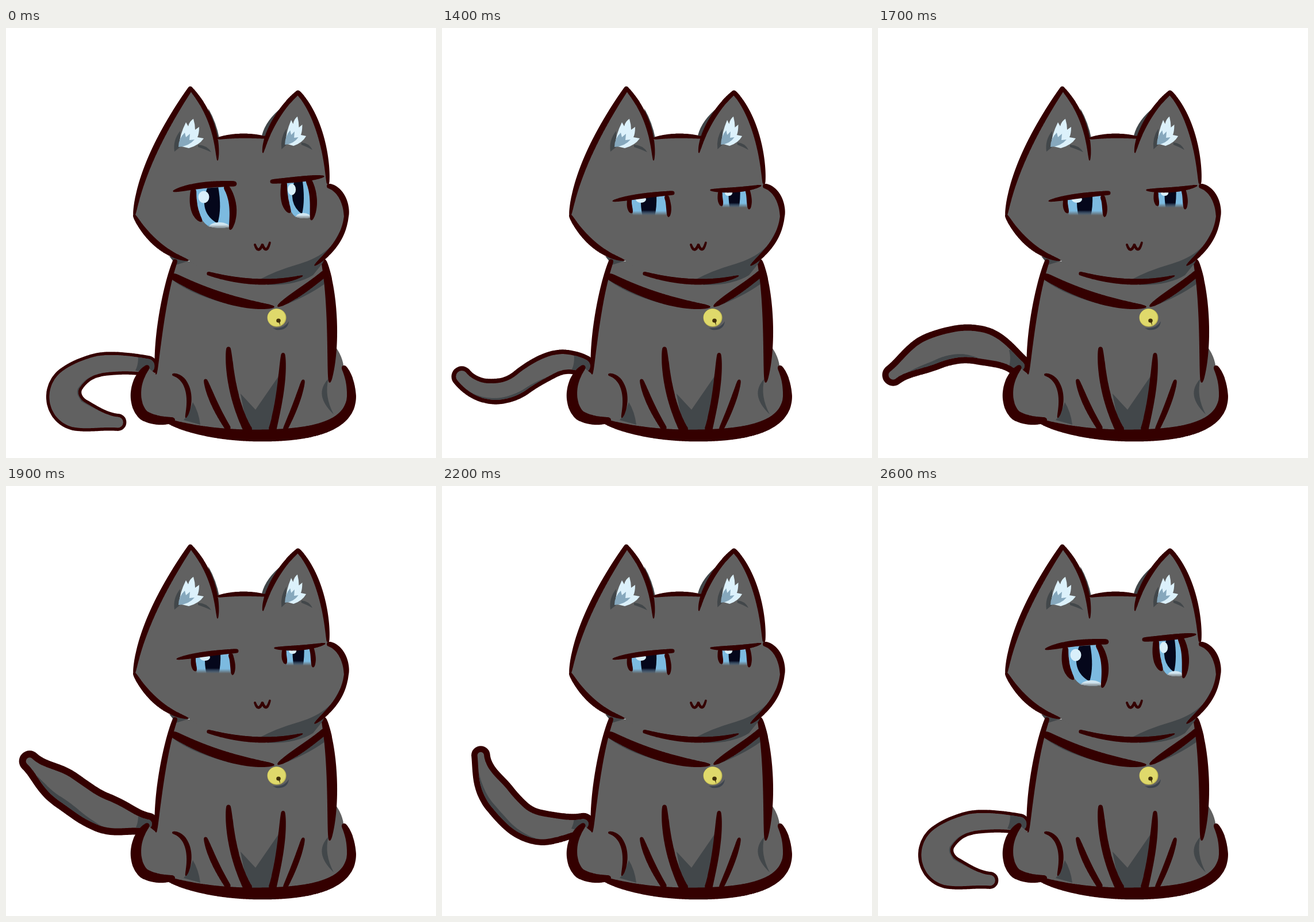
Recreate the animation shown at these times as an HTML page with a canvas. Size 748x748 px, loop 4 s.

```html
<!DOCTYPE html>
<html lang="en">
<head>
<meta charset="utf-8">
<title>Cat</title>
<style>
  html, body { margin: 0; width: 100%; height: 100%; overflow: hidden; background: #fff; }
  canvas { display: block; }
</style>
</head>
<body>
<canvas id="stage" width="748" height="748"></canvas>
<script>
const ctx = document.getElementById('stage').getContext('2d');
const FUR = '#616161', LINE = '#340000', SHADE = '#42474a';
const BLUE = '#7cbae0', PUPIL = '#05071b', SHINE = '#d9effa', TUFT = '#dcf1fb', TUFT_SHADE = '#86a8bd';
const { PI, sin, cos, min, max } = Math;
const lerp = (a, b, t) => a + (b - a) * t;

function fill(shape, color) {
  ctx.fillStyle = color;
  ctx.fill(typeof shape === 'string' ? new Path2D(shape) : shape);
}

function oval(x, y, rx, ry, color) {
  const path = new Path2D();
  path.ellipse(x, y, rx, ry, 0, 0, 7);
  fill(path, color);
}

function clipped(shape, draw) {
  ctx.save();
  ctx.clip(typeof shape === 'string' ? new Path2D(shape) : shape);
  draw();
  ctx.restore();
}

function fade(from, to, y0, y1) {
  const g = ctx.createLinearGradient(0, y0, 0, y1);
  g.addColorStop(0, from);
  g.addColorStop(1, to);
  return g;
}

// A round brush pressed at every point
function stamp(points, inset = 0) {
  const path = new Path2D();
  for (const { x, y, r } of points) {
    const size = max(r - inset, 0.3);
    path.moveTo(x + size, y);
    path.arc(x, y, size, 0, 7);
  }
  return path;
}

// Brush stroke along a curve: radius r0 and r1 at the ends, swelling to w between
const strokes = {};
function brush(d, w, r0, r1) {
  const curve = document.createElementNS('http://www.w3.org/2000/svg', 'path');
  curve.setAttribute('d', d);
  const length = curve.getTotalLength(), points = [];
  for (let at = 0; at <= length; at++) {
    const { x, y } = curve.getPointAtLength(at), s = at / length;
    points.push({ x, y, r: lerp(lerp(r0, r1, s), w, Math.sqrt(sin(PI * s))) });
  }
  return stamp(points);
}
function ink(d, w, r0 = w * 0.65, r1 = 0.6) {
  fill(strokes[[d, w]] ??= brush(d, w, r0, r1), LINE);
}

// Strokes that run round a shape in order also bound its fill
const contour = list => list.map(([d], i) => i ? d.replace('M', 'L') : d).join('') + 'Z';
const inkAll = list => list.forEach(stroke => ink(...stroke));

// ---- Tail: four circular arcs linking five headings ----

// Length, line weight, headings in degrees, radii from root to tip
const pose = (length, line, headings, radii) => ({ length: [length], line: [line], headings, radii });
const curl = pose(286, 5.5, [190, 176, 134, 18, 5], [18, 21, 32, 15]);
const drop = pose(232, 5.5, [188, 157, 139, 127, 118], [18, 26, 25, 11]);
const low = pose(242, 5.5, [184, 158, 149, 154, 182], [18, 21, 20, 13]);
const hook = pose(288, 10, [228, 155, 136, 215, 280], [21, 27, 25, 23]);
const arch = pose(243, 11, [222, 200, 170, 152, 142], [20, 34, 33, 19]);
const raised = pose(294, 13, [160, 190, 260, 278, 306], [20, 36, 36, 18]);

const keys = [[1100, curl], [1200, drop], [1300, low], [1500, hook], [1700, arch],
  [2100, raised], [2400, low], [2500, drop], [2600, curl]];

function tailAt(t) {
  const next = keys.findIndex(k => k[0] > t);
  const i = next < 0 ? keys.length - 1 : max(next, 1);
  const [t0, a] = keys[i - 1], [t1, b] = keys[i];
  const f = min(max((t - t0) / (t1 - t0), 0), 1), mix = {};
  for (const k in a) mix[k] = a[k].map((v, j) => lerp(v, b[k][j], f));
  mix.length[0] *= 1 - 0.12 * sin(PI * f); // foreshortened mid-swing
  return mix;
}

function along(values, s, ease = t => t) {
  const at = s * (values.length - 1), i = min(Math.floor(at), values.length - 2);
  return lerp(values[i], values[i + 1], ease(at - i));
}
const smooth = t => t * t * (3 - 2 * t);

function drawTail(t) {
  const { length: [length], line: [line], headings, radii } = tailAt(t);
  const steps = 200, spine = [];
  let x = 246, y = 588;
  for (let i = 0; i <= steps; i++) {
    const s = i / steps, a = along(headings, s) * PI / 180;
    spine.push({ x, y, a, s, r: along(radii, s, smooth) });
    x += length / steps * cos(a);
    y += length / steps * sin(a);
  }
  const inner = stamp(spine, line);
  fill(stamp(spine), LINE);
  fill(inner, FUR);
  // Crescent of shade along the underside
  const crescent = spine.filter(p => p.s > 0.3 && p.s < 0.9).map(({ x, y, a, s, r }) => ({
    x: x + (r - line) * sin(a),
    y: y - (r - line) * cos(a),
    r: (line - 4) * sin(PI * (s - 0.3) / 0.6)
  }));
  clipped(inner, () => {
    fill(stamp(crescent), SHADE);
    fill('M228 560Q233 580 225 596L262 604V560Z', SHADE);
  });
}

// ---- Body ----

const torso = [
  ['M261 602C263 540 276 455 294 406', 5.5, 0.8, 4],
  ['M553 406C566 450 572 540 563 616', 9, 4, 0.8],
  ['M588 591Q600 610 601 640C600 690 540 709 440 709C380 709 320 700 280 683', 10.5, 4, 3],
  ['M290 682Q262 686 240 674C219 655 222 612 246 590', 9.5, 4, 3.5]
];
const limbs = [
  ['M291 603C314 606 326 640 313 677', 4.5, 2, 1],
  ['M387 558Q390 640 420 698', 7, 3.5, 8],
  ['M347 613Q360 655 386 696', 6, 2.5, 5],
  ['M482 568Q481 630 464 697', 6.5, 3, 7],
  ['M517 614Q508 650 486 697', 5.2, 2.5, 4]
];
const collar = [
  ['M293 433Q385 482 466 485', 8.5, 6],
  ['M553 428Q520 455 473 484', 6.5, 6]
];

function drawBody() {
  fill('M571 552Q586 570 588 594L563 620Z', FUR);
  fill(contour(torso), FUR);
  fill('M284 397L322 404 296 412Z', SHADE);
  fill('M289 438Q325 466 400 484L330 446Z', SHADE);
  fill('M556 430L553 446Q525 466 482 483L530 440Z', SHADE);
  fill('M408 636L434 664 474 606 464 700H420Z', SHADE);
  fill('M325 651Q317 674 309 682L338 690Q335 667 325 651Z', SHADE);
  fill('M561 610Q534 638 570 672 553 640 561 610Z', SHADE);
  inkAll([...torso, ...limbs, ...collar]);
  fill('M464 522Q484 524 492 510 490 527 470 525Z', '#3d444e');
  oval(471, 504, 16.5, 15.8, '#c4bd55');
  oval(470.5, 503.5, 15.5, 15, '#dfd96b');
  oval(474, 509, 3.8, 3.6, '#40300a');
  fill('M473 509H476L477 518Z', '#40300a');
}

// ---- Head ----

const skull = [
  ['M223 326C233 250 278 168 321 105', 5.5, 1.5, 4],
  ['M321 105C350 138 368 180 368 230', 4.5],
  ['M369 192Q410 184 455 191', 4, 1.5, 1],
  ['M447 217C452 180 480 135 508 112', 4.5, 0.6, 3.5],
  ['M508 112C535 140 558 200 560 270', 5, 3.5, 2],
  ['M562 275C582 280 593 305 592 327', 5.5, 4, 4],
  ['M592 327C588 365 565 390 537 413', 4.5, 4],
  ['M516 431C470 447 410 444 352 427', 5, 0.5, 3],
  ['M317 404C277 395 243 363 223 326', 5.5, 0.5, 2]
];

function drawTuft(x, y, width) {
  ctx.save();
  ctx.translate(x, y);
  ctx.scale(width, 1);
  fill('M2-27Q-11-11-8 9L2 1Z', SHADE);
  fill('M33-3Q49-2 56 10 43 4 33 1Z', SHADE);
  fill('M0-1Q1-20 12-42L16-35Q18-44 25-48 28-38 28-29L35-34Q35-22 32-16L43-14Q35-2 17 3Z', TUFT);
  fill('M-1 1Q-1-14 10-24L12-16 19-22 18-11 27-12Q17 0-1 1Z', TUFT_SHADE);
  ctx.restore();
}

function drawHead() {
  fill('M352 140Q366 165 371 192L360 194Z', SHADE);
  fill('M480 138Q452 160 445 187L456 191Z', SHADE);
  fill(contour(skull), FUR);
  fill('M591 335C575 385 540 402 505 412Q470 422 440 438L455 447Q505 448 534 430L550 410Z', SHADE);
  inkAll(skull);
  ink('M433 377Q439 394 446 377Q453 395 459 373', 2.4, 2, 1.8);
  drawTuft(301, 206, 1);
  drawTuft(486, 202, 0.84);
}

// ---- Eyes ----

function openEye(k) {
  const iris = 'M0 2L57-2Q66 40 61 68 41 72 23 67-1 50 0 2Z';
  fill(iris, BLUE);
  clipped(iris, () => {
    fill('M22-2H40Q47 36 39 62 4 42 22-2Z', PUPIL);
    oval(15, 16, 9.5, 10.5, SHINE);
    oval(42, 70, 19, 10, '#d2e7f2');
    ctx.fillStyle = fade(FUR + '00', FUR, 64, 72);
    ctx.fillRect(0, 64, 70, 10);
  });
  ink('M-3 6C-5 30 0 48 11 58', 6.5 / k, 5 / k);
  ink('M55 0C66 18 70 45 61 72', 6.3 / k, 5 / k, 1);
}

function halfEye(k) {
  const iris = 'M0 4L62 0V38H3Z';
  fill(iris, fade(BLUE, BLUE + '00', 28, 36));
  clipped(iris, () => {
    fill('M17 0H44Q45 20 41 38H20Q16 22 17 0Z', fade(PUPIL, PUPIL + '00', 27, 36));
    oval(17, 8, 9, 6, SHINE);
  });
  ink('M-3 10Q-4 22 1 31', 4.5 / k, 4 / k);
  ink('M62 5Q67 20 65 38', 4.5 / k, 4 / k);
}

function placeEye(draw, x, y, kx, ky) {
  ctx.save();
  ctx.translate(x, y);
  ctx.scale(kx, ky);
  draw(kx);
  ctx.restore();
}

function drawEyes(open) {
  const eye = open ? openEye : halfEye;
  placeEye(eye, 329, open ? 278 : 290, 1, 1);
  placeEye(eye, 486, open ? 266 : 279, 0.74, 0.93);
  if (open) {
    ink('M291 284Q340 270 397 271', 5.5, 0.6, 4.5);
    ink('M463 267Q510 264 553 258', 5, 3.5);
  } else {
    ink('M297 301Q345 291 401 287', 4.5, 0.6, 3.5);
    ink('M467 282Q520 284 555 274', 4.5, 0.8);
  }
}

// ---- Playback ----

let shown = -1;
function frame(now) {
  const t = Math.floor(now % 4000 / 100) * 100;
  if (t !== shown) {
    shown = t;
    ctx.clearRect(0, 0, 748, 748);
    drawTail(t);
    drawBody();
    drawHead();
    drawEyes(t < 1400 || t >= 2300);
  }
  requestAnimationFrame(frame);
}
frame(performance.now());
</script>
</body>
</html>
```
